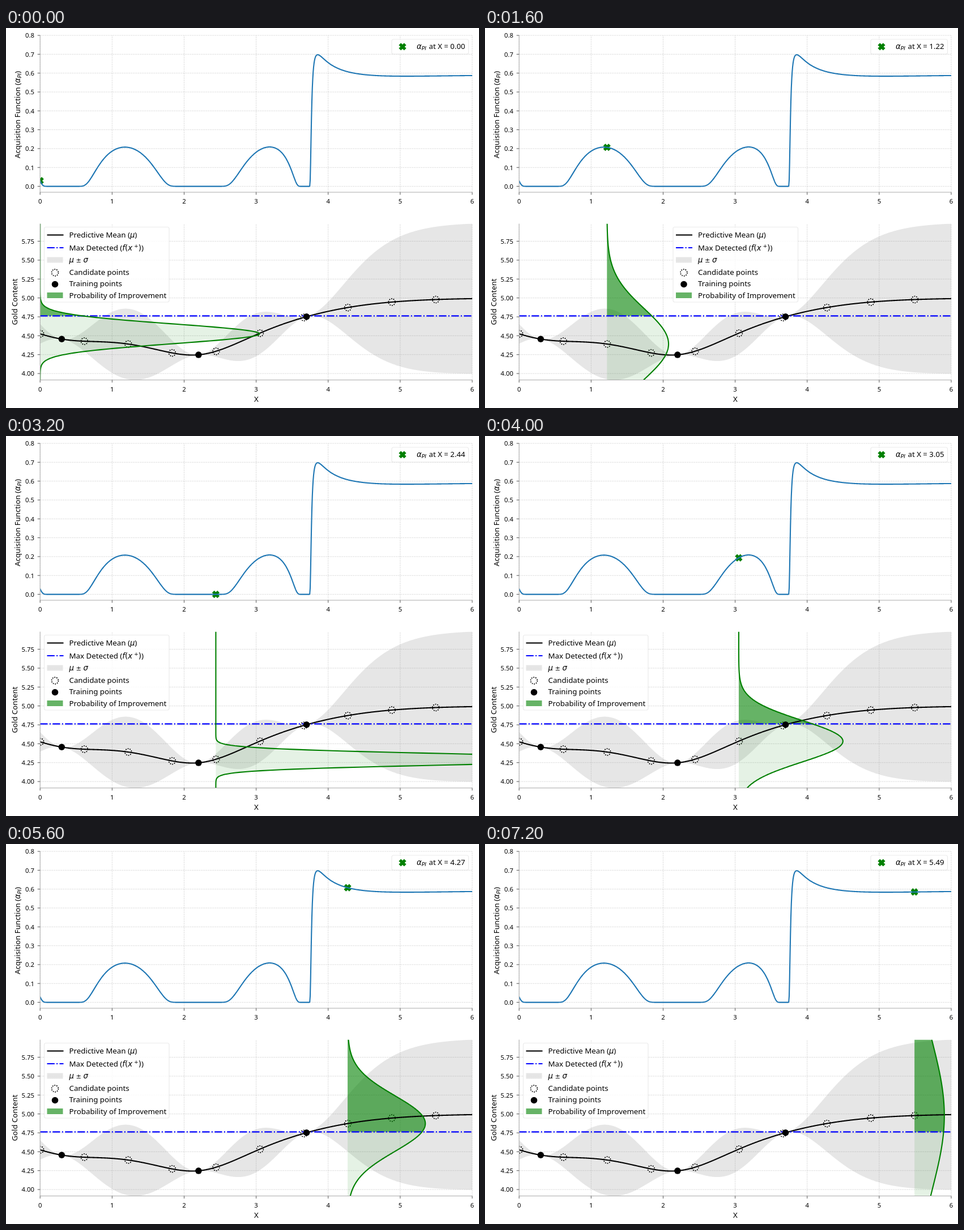
Write an HTML page with a canvas that moves like this. It is 835x671 px and loops after 8000 ms.

```html
<!DOCTYPE html>
<html lang="en">
<head>
<meta charset="utf-8">
<title>Probability of improvement</title>
<style>
html, body { margin: 0; width: 100%; height: 100%; overflow: hidden; background: #fff; }
canvas { display: block; }
</style>
</head>
<body>
<canvas id="plot" width="835" height="671"></canvas>
<script>
const ctx = document.getElementById('plot').getContext('2d');
const SANS = '"Noto Sans", "Open Sans", sans-serif';
const MATH = '"DejaVu Sans", sans-serif';
const STEP_MS = 800, STEPS = 10, STEP_X = 0.61;

// Gaussian process: Matern 5/2 kernel, unit length scale, prior mean 5
const PRIOR = 5;
const train = [[0.3, 4.456], [2.2, 4.248], [3.7, 4.752]];
const best = 4.762, target = 4.772;

function kernel(a, b) {
  const s = Math.sqrt(5) * Math.abs(a - b);
  return (1 + s + s * s / 3) * Math.exp(-s);
}
const L = [];
function solveLower(b) {
  const out = [];
  b.forEach((v, i) => {
    for (let j = 0; j < i; j++) v -= L[i][j] * out[j];
    out.push(v / L[i][i]);
  });
  return out;
}
train.forEach(([x], i) => {
  const row = solveLower(train.slice(0, i).map(p => kernel(x, p[0])));
  L.push([...row, Math.sqrt(1 - row.reduce((s, v) => s + v * v, 0))]);
});
const residual = solveLower(train.map(p => p[1] - PRIOR));

function predict(x) {
  const v = solveLower(train.map(p => kernel(x, p[0])));
  return {
    mean: PRIOR + v.reduce((s, a, i) => s + a * residual[i], 0),
    spread: Math.max(1e-9, 1 - v.reduce((s, a) => s + a * a, 0))
  };
}
const density = z => Math.exp(-z * z / 2) / Math.sqrt(2 * Math.PI);
function cumulative(z) {
  const t = 1 / (1 + 0.2316419 * Math.abs(z));
  const tail = density(z) * t * (0.31938153 + t * (-0.356563782 +
    t * (1.781477937 + t * (-1.821255978 + t * 1.330274429))));
  return z > 0 ? 1 - tail : tail;
}
function improvement(x) {
  const { mean, spread } = predict(x);
  return cumulative((mean - target) / spread);
}

const range = (a, b, n) => Array.from({ length: n + 1 }, (_, i) => a + (b - a) * i / n);
const xs = range(0, 6, 1000);
const model = xs.map(predict);
const lo = Math.min(...model.map(m => m.mean - m.spread));
const hi = Math.max(...model.map(m => m.mean + m.spread));

const LEFT = 60.2, RIGHT = 823;
const top1 = { top: 13, bottom: 290 }, top2 = { top: 345.5, bottom: 621.5 };
const px = x => LEFT + x * (RIGHT - LEFT) / 6;
const pyA = v => 279.6 - v * 333.2;
const pyB = y => top2.bottom - (y - lo) / (hi - lo) * (top2.bottom - top2.top);

const meanLine = xs.map((x, i) => [px(x), pyB(model[i].mean)]);
const band = [
  ...xs.map((x, i) => [px(x), pyB(model[i].mean + model[i].spread)]),
  ...xs.map((x, i) => [px(x), pyB(model[i].mean - model[i].spread)]).reverse()
];
const acquisition = xs.map(x => [px(x), pyA(improvement(x))]);
const candidates = range(0, STEP_X * (STEPS - 1), STEPS - 1);

function trace(points) {
  ctx.beginPath();
  points.forEach(p => ctx.lineTo(...p));
}
function line(points, color, width = 2.1, dash = []) {
  trace(points);
  ctx.strokeStyle = color;
  ctx.lineWidth = width;
  ctx.setLineDash(dash);
  ctx.stroke();
  ctx.setLineDash([]);
}
function area(points, color) {
  trace(points);
  ctx.fillStyle = color;
  ctx.fill();
}
const dashDot = [13.3, 3.3, 2.1, 3.3];

function dot(x, y) {
  ctx.beginPath();
  ctx.arc(x, y, 5.8, 0, 7);
  ctx.fillStyle = '#000';
  ctx.fill();
}
function dottedCircle(x, y) {
  const r = 5.9, dash = 2 * Math.PI * r / 10;
  ctx.beginPath();
  ctx.arc(x, y, r, 0, 2 * Math.PI);
  ctx.strokeStyle = '#000';
  ctx.lineWidth = 1.7;
  ctx.setLineDash([dash * 0.48, dash * 0.52]);
  ctx.stroke();
  ctx.setLineDash([]);
}
function cross(x, y) {
  const quarter = [[0, -1], [1, -2], [2, -1]];
  const points = [];
  for (let k = 0; k < 4; k++) {
    const c = [1, 0, -1, 0][k], s = [0, 1, 0, -1][k];
    quarter.forEach(([u, v]) => points.push([x + 2.8 * (u * c - v * s), y + 2.8 * (u * s + v * c)]));
  }
  area(points, '#008000');
  ctx.closePath();
  ctx.strokeStyle = '#008000';
  ctx.lineWidth = 1.4;
  ctx.stroke();
}

function text(str, x, y, size, align = 'left') {
  ctx.font = `${size}px ${SANS}`;
  ctx.textAlign = align;
  ctx.fillStyle = '#000';
  ctx.fillText(str, x, y);
}
// Parts: [string, style, size factor, rise]; style 'i' is math italic, 'm' math upright
function rich(parts, x, y, size) {
  ctx.textAlign = 'left';
  ctx.fillStyle = '#000';
  for (const [str, style, scale = 1, rise = 0] of parts) {
    ctx.font = `${style === 'i' ? 'italic ' : ''}${size * scale}px ${style ? MATH : SANS}`;
    ctx.fillText(str, x, y - rise);
    x += ctx.measureText(str).width;
  }
}
function vertical(x, y, draw) {
  ctx.save();
  ctx.translate(x, y);
  ctx.rotate(-Math.PI / 2);
  draw();
  ctx.restore();
}
function clipped({ top, bottom }, draw) {
  ctx.save();
  ctx.beginPath();
  ctx.rect(LEFT, top, RIGHT - LEFT, bottom - top);
  ctx.clip();
  draw();
  ctx.restore();
}
function legendBox(x, y, w, h) {
  ctx.beginPath();
  ctx.roundRect(x, y, w, h, 3);
  ctx.fillStyle = 'rgba(255,255,255,.8)';
  ctx.fill();
  ctx.strokeStyle = 'rgba(204,204,204,.4)';
  ctx.lineWidth = 1.2;
  ctx.stroke();
}

function grid(box, ticks, py) {
  const style = ['rgba(176,176,176,.4)', 1, [3, 1]];
  range(0, 6, 6).forEach(x => line([[px(x), box.bottom], [px(x), box.top]], ...style));
  ticks.forEach(v => line([[LEFT, py(v)], [RIGHT, py(v)]], ...style));
}
function axes(box, ticks, py, digits) {
  line([[LEFT, box.top], [LEFT, box.bottom], [RIGHT, box.bottom]], '#aaa', 1);
  range(0, 6, 6).forEach(x => {
    line([[px(x), box.bottom], [px(x), box.bottom + 4.5]], '#555', 1);
    text(x, px(x), box.bottom + 20, 11.3, 'center');
  });
  ticks.forEach(v => {
    line([[LEFT - 4.5, py(v)], [LEFT, py(v)]], '#555', 1);
    text(v.toFixed(digits), 50, py(v) + 4.3, 11.3, 'right');
  });
}

const alphaPI = [['α', 'i'], ['PI', 'i', 0.7, -2.2]];

function drawAcquisition(x) {
  const ticks = range(0, 0.8, 8);
  grid(top1, ticks, pyA);
  clipped(top1, () => {
    cross(px(x), pyA(improvement(x)));
    line(acquisition, '#1f77b4');
  });
  axes(top1, ticks, pyA, 1);
  vertical(25, 230, () => rich([['Acquisition Function ('], ...alphaPI, [')']], 0, 0, 13.2));
  legendBox(681, 20, 135.5, 26);
  cross(700, 33);
  rich(alphaPI, 725, 36.5, 13.3);
  text(`at X = ${x.toFixed(2)}`, 810.5, 36.5, 13.2, 'right');
}

function drawLegend(x) {
  const y = 351.5;
  legendBox(x, y, 220.5, 132.5);
  const mid = x + 19, label = x + 44;
  const sample = row => [[x + 5, row], [x + 34, row]];
  line(sample(365.5), '#000');
  rich([['Predictive Mean ('], ['μ', 'i'], [')']], label, 370, 13.3);
  line(sample(388), '#00f', 2.1, dashDot);
  rich([['Max Detected ('], ['f', 'i'], ['(', 'm'], ['x', 'i'], [' +', 'm', 0.7, 5],
    [')', 'm'], [')']], label, 392.5, 13.3);
  ctx.fillStyle = 'rgba(128,128,128,.2)';
  ctx.fillRect(x + 5, 404.5, 28, 10);
  rich([['μ', 'i'], [' ± ', 'm', 0.85], ['σ', 'i']], label, 414, 13.3);
  dottedCircle(mid, 432);
  text('Candidate points', label, 435.5, 13.3);
  dot(mid, 452.5);
  text('Training points', label, 456, 13.3);
  ctx.fillStyle = 'rgba(0,128,0,.6)';
  ctx.fillRect(x + 5, 467, 28, 10);
  text('Probability of Improvement', label, 476.5, 13.3);
}

function drawModel(x, step) {
  const ticks = range(4, 5.75, 7);
  const { mean, spread } = predict(x);
  // A peak narrower than the sampling leaves only the vertical line
  const bell = y => [px(x + (spread < 0.01 ? 0 : density((y - mean) / spread) / spread)), pyB(y)];
  const bellArea = (a, b) => [[px(x), pyB(a)], ...range(a, b, 200).map(bell), [px(x), pyB(b)]];

  grid(top2, ticks, pyB);
  clipped(top2, () => {
    area(band, 'rgba(128,128,128,.2)');
    candidates.forEach(c => dottedCircle(px(c) + 0.5, pyB(predict(c).mean)));
    area(bellArea(lo, best), 'rgba(0,128,0,.1)');
    area(bellArea(best, hi), 'rgba(0,128,0,.6)');
    line(meanLine, '#000');
    line([[LEFT, pyB(best)], [RIGHT, pyB(best)]], '#00f', 2.1, dashDot);
    line(range(lo, hi, 300).map(bell), '#008000');
    train.forEach(([tx, ty]) => dot(px(tx), pyB(ty)));
  });
  axes(top2, ticks, pyB, 2);
  text('X', 441.8, 660, 13.3, 'center');
  vertical(20, 483.5, () => text('Gold Content', 0, 0, 13.2, 'center'));
  drawLegend(step === 1 || step === 2 ? 332 : 67.5);
}

function frame(now) {
  const step = Math.floor(now / STEP_MS) % STEPS;
  const x = step * STEP_X;
  ctx.fillStyle = '#fff';
  ctx.fillRect(0, 0, 835, 671);
  drawAcquisition(x);
  drawModel(x, step);
  requestAnimationFrame(frame);
}
requestAnimationFrame(frame);
</script>
</body>
</html>
```
